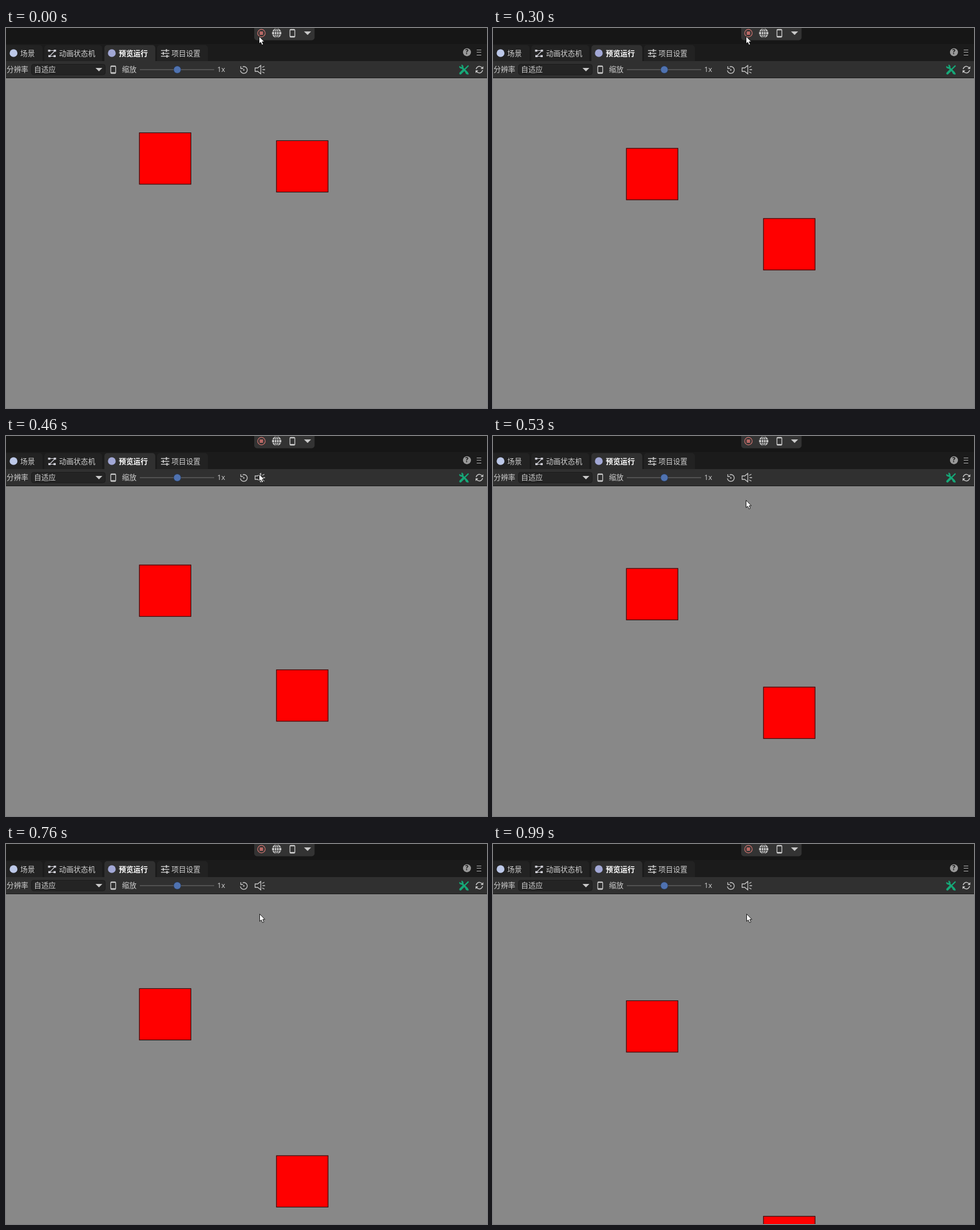
An HTML page with a canvas that plays this animation: 841x666 px, repeating every 1070 ms.

```html
<!DOCTYPE html>
<html lang="zh">
<head>
<meta charset="utf-8">
<title>Preview</title>
<style>
html, body { margin: 0; width: 100%; height: 100%; overflow: hidden; background: #888; }
canvas { display: block; }
</style>
</head>
<body>
<canvas id="stage" width="841" height="666"></canvas>
<script>
const ctx = document.getElementById('stage').getContext('2d');
const LOOP = 1070, STEPS = 14, TAU = Math.PI * 2;
const SANS = '"Noto Sans CJK SC", "Noto Sans CJK", sans-serif';
const LIGHT = '#c8c8c8';

function box(x, y, w, h, color) {
  ctx.fillStyle = color;
  ctx.fillRect(x, y, w, h);
}

function round(x, y, w, h, r, fill, stroke, width = 1) {
  ctx.beginPath();
  ctx.roundRect(x, y, w, h, r);
  if (fill) { ctx.fillStyle = fill; ctx.fill(); }
  if (stroke) { ctx.strokeStyle = stroke; ctx.lineWidth = width; ctx.stroke(); }
}

function disc(x, y, r, color) {
  ctx.beginPath();
  ctx.arc(x, y, r, 0, TAU);
  ctx.fillStyle = color;
  ctx.fill();
}

function arc(x, y, r, from, to, color, width) {
  ctx.beginPath();
  ctx.arc(x, y, r, from, to);
  ctx.strokeStyle = color;
  ctx.lineWidth = width;
  ctx.stroke();
}

function draw(path, color, width) {
  const p = new Path2D(path);
  if (width) {
    ctx.strokeStyle = color;
    ctx.lineWidth = width;
    ctx.stroke(p);
  } else {
    ctx.fillStyle = color;
    ctx.fill(p);
  }
}

function label(text, x, y, color = '#d0d0d0', weight = 400, font = SANS, size = 12.7) {
  ctx.font = `${weight} ${size}px ${font}`;
  ctx.fillStyle = color;
  ctx.fillText(text, x, y);
}

function phone(x, y, w, h) {
  round(x, y, w, h, 1.5, null, LIGHT, 1.4);
  box(x, y, w, 1.6, LIGHT);
  box(x, y + h - 2, w, 2, LIGHT);
}

function runBar() {
  box(0, 0, 841, 28, '#161616');
  round(434, -6, 105.5, 27.5, 5, '#333');
  arc(446.6, 9, 6.6, 0, TAU, '#cf7570', 1.2);
  box(443.5, 6, 6, 6, '#b96865');

  disc(473.3, 9, 8.2, LIGHT);
  ctx.beginPath();
  ctx.ellipse(473.3, 9, 3.9, 8.2, 0, 0, TAU);
  ctx.strokeStyle = '#333';
  ctx.lineWidth = 1.1;
  ctx.stroke();
  draw('M465 6.2h16.6M465 11.8h16.6M473.3 .5v17', '#333', 1.1);

  phone(496.5, 2.5, 8.5, 13.5);
  draw('M521 6h12.5l-6.2 6.3z', LIGHT);
}

function tabs() {
  box(0, 28, 841, 30, '#1b1b1b');
  for (const [x, w, color] of [[-6, 70, '#222'], [67, 101, '#222'], [172, 89, '#303030'], [264, 89, '#222']])
    round(x, 30, w, 28, [5, 5, 0, 0], color);

  disc(13.2, 44, 6.8, '#bcc8e8');
  label('场景', 25, 48.8);

  for (const [x, y] of [[73.5, 38], [83.5, 38], [74, 47.5], [83, 47.5]]) box(x, y, 4, 3.5, '#d0d0d8');
  draw('M77 39.5h7M84.5 41l-7 7M78 49.5h6', '#d0d0d8', 1.2);
  label('动画状态机', 92.7, 48.8);

  disc(185, 44, 6.8, '#a2a8d6');
  label('预览运行', 197.2, 48.8, '#fff', 700);

  draw('M271 39.5h14.5M271 44.5h14.5M271 49.5h14.5', LIGHT, 1.5);
  for (const [x, y] of [[279.5, 37], [274, 42], [280.5, 47]]) box(x, y, 2, 5, LIGHT);
  label('项目设置', 289.3, 48.8);

  disc(806, 42.4, 7, '#999');
  label('?', 803.1, 46.4, '#1b1b1b', 700, '"Open Sans", sans-serif', 11.5);
  draw('M823 38.5h8M823 42.5h8M823 47.5h8', '#b4b4b4', 1.2);
}

function toolbar() {
  box(0, 58, 841, 29, '#303030');
  box(0, 87, 841, 1, '#181818');
  label('分辨率', 1, 77.3);
  round(44.5, 63.5, 129, 18.5, 4, '#242424', '#1c1c1c');
  label('自适应', 49, 77.3);
  draw('M156.5 70h12l-6 6z', LIGHT);
  phone(183.2, 66.5, 8.5, 13);

  label('缩放', 202.7, 77.3);
  box(234, 72.5, 130, 1, '#757575');
  disc(299.5, 73, 6.8, '#283a58');
  disc(299.5, 73, 6, '#4f72b0');
  label('1x', 369.3, 77.3, '#d0d0d0', 400, '"Open Sans", "Noto Sans", sans-serif', 12.7);

  arc(415.8, 73.5, 6, -1.9, 3, LIGHT, 1.3);
  draw('M410.5 67v4h4', LIGHT, 1.3);
  disc(415.8, 73.5, 1.2, LIGHT);

  draw('M435.5 70h4.5l5.5-4.3v14.6l-5.5-4.3h-4.5z', LIGHT, 1.3);
  draw('M448 69l3.8-2M448.5 73h4.5M448 77l3.8 2', LIGHT, 1.3);

  const green = '#16a878';
  ctx.lineCap = 'round';
  draw('M808 66.5l-6 6', green, 2.4);
  draw('M799.5 74.5l-5 5', green, 4);
  draw('M797 69.2l9.5 9.5', green, 3.2);
  draw('M793.4 68a3.5 3.5 0 0 0 5 1.8a3.5 3.5 0 0 0-1.2-4.3M804 77a3.5 3.5 0 0 0 4 3.4', green, 2.2);
  ctx.lineCap = 'butt';

  arc(827.7, 73, 5.7, 3.3, 5.7, LIGHT, 1.5);
  arc(827.7, 73, 5.7, 0.16, 2.56, LIGHT, 1.5);
  draw('M834.5 67v4.8h-4.8zM821 79v-4.8h4.8z', LIGHT);
}

function square(x, y) {
  const size = 91.2, line = 1.1;
  box(x, y, size, size, '#f00');
  ctx.strokeStyle = '#181818';
  ctx.lineWidth = line;
  ctx.strokeRect(x + line / 2, y + line / 2, size - line, size - line);
}

function pointer(x, y) {
  const p = new Path2D('M.5 .7V13.6L3.4 11L5.5 15.8L7.9 14.8L5.9 10.1H9.7Z');
  ctx.save();
  ctx.translate(x, y);
  ctx.lineJoin = 'round';
  ctx.fillStyle = '#fff';
  ctx.fill(p);
  ctx.strokeStyle = '#111';
  ctx.lineWidth = 1;
  ctx.stroke(p);
  ctx.restore();
}

const starts = Array.from({ length: STEPS }, (_, i) => Math.round(i * 99 / 13) * 10);
const pointerY = [14, 14, 14, 14, 14, 18, 66, 112, 119];

function render(ms) {
  const step = starts.findLastIndex(s => s <= ms);
  const ticks = Math.round(step * 60 / 13);
  box(0, 88, 841, 578, '#888');
  square(232.7, 183.1 + ticks * 91 / 60);
  square(472.4, 196.9 + ticks * 455 / 60);
  runBar();
  tabs();
  toolbar();
  pointer(step < 9 ? 442 : 443, pointerY[step] ?? 122);
}

const origin = performance.now();
function tick() {
  render((performance.now() - origin) % LOOP);
  requestAnimationFrame(tick);
}
tick();
</script>
</body>
</html>
```
